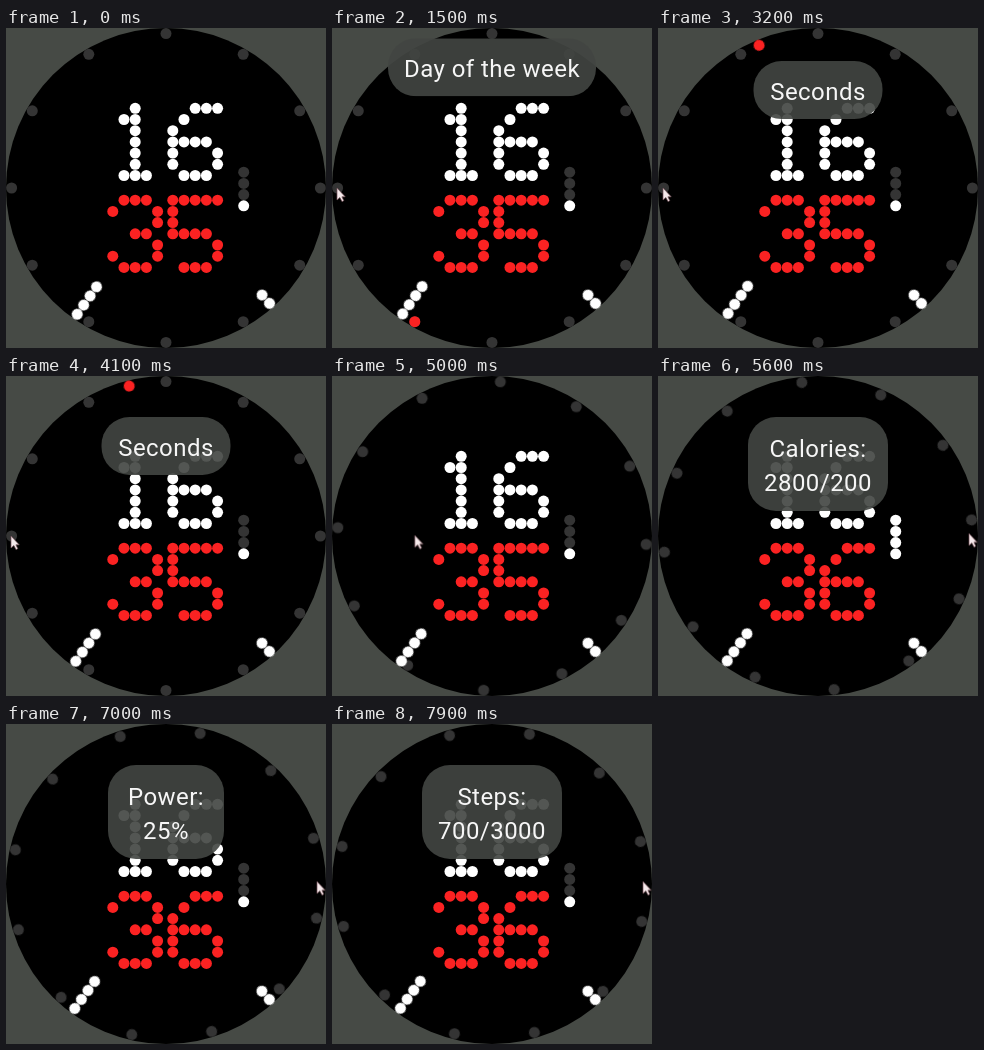
An HTML page for the animation above (8000 ms loop, 320 by 320 pixels).

```html
<!DOCTYPE html>
<html lang="en">
<head>
<meta charset="utf-8">
<title>Dot watch face</title>
<style>
  html, body { margin: 0; width: 100%; height: 100%; overflow: hidden; background: #464a45; }
  svg { display: block; width: 100vw; height: 100vh; }
  svg * { animation-duration: 8s; animation-iteration-count: infinite; animation-timing-function: linear; }

  .white { fill: #fff; }
  .red { fill: #fb2222; }
  .grey { fill: #343434; }

  .spin { transform-origin: 160px 160px; }
  #ring { animation-name: ring; }
  #minute { animation-name: minute; }
  #hour { animation-name: hour; }
  #second { animation-name: second; }

  .show { opacity: 0; animation-timing-function: step-end; }
  #five { animation-name: five; }
  #six { animation-name: six; }
  #full { animation-name: full; }
  #dayMark { animation-name: dayMark; }
  #monthMark { animation-name: monthMark; }
  #secondMark { animation-name: secondMark; }

  #toasts { animation-name: drop; animation-timing-function: ease-in-out; }
  #toasts rect { fill: #424643; fill-opacity: .91; }
  #toasts text {
    fill: #f6f6f6; text-anchor: middle;
    font: 24px Roboto, sans-serif; letter-spacing: .45px;
  }
  #day { animation-name: day; }
  #month { animation-name: month; }
  #seconds { animation-name: seconds; animation-timing-function: linear; }
  #calories { animation-name: calories; }
  #power { animation-name: power; }
  #steps { animation-name: steps; }

  #cursor { animation-name: move; animation-timing-function: ease-in-out; }
  #arrow { animation-name: arrow; }

  @keyframes minute { from { transform: rotate(215.11deg); } to { transform: rotate(216.39deg); } }
  @keyframes hour { from { transform: rotate(138.1deg); } to { transform: rotate(138.21deg); } }
  @keyframes second { from { transform: rotate(306.84deg); } to { transform: rotate(383.64deg); } }
  @keyframes ring {
    0%, 61.4% { transform: rotate(0deg); }
    91.25%, 94.99% { transform: rotate(83.2deg); }
    95% { transform: rotate(93.6deg); }
    100% { transform: rotate(107.5deg); }
  }

  @keyframes five { 0% { opacity: 1; } 69.2%, 100% { opacity: 0; } }
  @keyframes six { 0% { opacity: 0; } 69.2%, 100% { opacity: 1; } }
  @keyframes full { 0% { opacity: 0; } 64% { opacity: 1; } 78.7%, 100% { opacity: 0; } }
  @keyframes dayMark { 0% { opacity: 0; } 17% { opacity: 1; } 26.25%, 100% { opacity: 0; } }
  @keyframes monthMark { 0% { opacity: 0; } 26.25% { opacity: 1; } 36.25%, 100% { opacity: 0; } }
  @keyframes secondMark { 0% { opacity: 0; } 36.25% { opacity: 1; } 61.4%, 100% { opacity: 0; } }

  /* every message slides down from the same height */
  @keyframes drop {
    0%, 17.87%, 27.5%, 36.88%, 57.5%, 64.75%, 79%, 93.88% { transform: translateY(-33px); }
    22.62%, 27.49%, 32.25%, 36.87%, 41.63%, 54.37%, 69.5%, 78.99%, 83.75%, 93.87%, 98.63%, 100% { transform: translateY(0); }
  }
  @keyframes day { 0% { opacity: 0; } 17.87% { opacity: 1; } 27.5%, 100% { opacity: 0; } }
  @keyframes month { 0% { opacity: 0; } 27.5% { opacity: 1; } 36.88%, 100% { opacity: 0; } }
  @keyframes seconds { 0%, 36.87% { opacity: 0; } 36.88%, 54.37% { opacity: 1; } 57.5%, 100% { opacity: 0; } }
  @keyframes calories { 0% { opacity: 0; } 64.75% { opacity: 1; } 79%, 100% { opacity: 0; } }
  @keyframes power { 0% { opacity: 0; } 79% { opacity: 1; } 93.88%, 100% { opacity: 0; } }
  @keyframes steps { 0% { opacity: 0; } 93.88%, 100% { opacity: 1; } }

  @keyframes arrow { 0% { opacity: 0; } .7%, 100% { opacity: 1; } }
  @keyframes move {
    0% { transform: translate(301px, 106px); }
    16.25%, 61.5% { transform: translate(5px, 160px); }
    64.4%, 100% { transform: translate(311px, 157.5px); }
  }
</style>
</head>
<body>
<svg viewBox="0 0 320 320">
  <circle cx="160" cy="160" r="160"/>
  <g id="ring" class="spin grey"></g>
  <g id="dayMark" class="show red"></g>
  <g id="monthMark" class="show red"></g>
  <g id="secondMark" class="show red"><g id="second" class="spin"></g></g>
  <g id="minute" class="spin white"></g>
  <g id="hour" class="spin white"></g>
  <g id="hours" class="white"></g>
  <g id="tens" class="red"></g>
  <g id="five" class="show red"></g>
  <g id="six" class="show red"></g>
  <g id="meter" class="grey"></g>
  <g id="base" class="white"></g>
  <g id="full" class="show white"></g>
  <g id="toasts"></g>
  <g id="cursor"><path id="arrow" class="show" d="M0 0V12L2.9 9.5L5 13.6L6.8 12.7L4.9 8.8H8.2Z" fill="#f5e9eb" stroke="#76525a" stroke-width=".7"/></g>
</svg>
<script>
  const $ = id => document.getElementById(id);
  const NS = "http://www.w3.org/2000/svg";
  const PITCH = 11.2, RIM = 154.4;

  function add(parent, tag, attrs, text) {
    const el = document.createElementNS(NS, tag);
    for (const key in attrs) el.setAttribute(key, attrs[key]);
    if (text) el.textContent = text;
    return parent.appendChild(el);
  }

  const dot = (id, x, y) => add($(id), "circle", { cx: x, cy: y, r: 5.5 });

  function polar(id, deg, radius = RIM) {
    const a = deg * Math.PI / 180;
    dot(id, 160 + radius * Math.sin(a), 160 - radius * Math.cos(a));
  }

  const glyphs = {
    1: "..#.. .##.. ..#.. ..#.. ..#.. ..#.. .###.",
    3: ".###. #...# ....# ..##. ....# #...# .###.",
    5: "##### #.... #.... ####. ....# ....# .###.",
    6: "..### .#... #.... ####. #...# #...# .###."
  };

  function digit(id, n, x, y) {
    glyphs[n].split(" ").forEach((row, j) =>
      [...row].forEach((c, i) => c === "#" && dot(id, x + i * PITCH, y + j * PITCH)));
  }

  digit("hours", 1, 106.8, 80.3);
  digit("hours", 6, 166.8, 80.3);
  digit("tens", 3, 106.8, 172.2);
  digit("five", 5, 166.8, 172.2);
  digit("six", 6, 166.8, 172.2);

  for (let i = 0; i < 12; i++) polar("ring", i * 30);
  for (let i = 0; i < 4; i++) polar("minute", 0, RIM - i * PITCH);
  for (let i = 0; i < 2; i++) polar("hour", 0, RIM + .6 - i * PITCH);
  polar("dayMark", 210);
  polar("monthMark", 30);
  polar("second", 0);

  for (let i = 0; i < 3; i++) {
    dot("meter", 237.7, 144.2 + i * PITCH);
    dot("full", 237.7, 144.2 + i * PITCH);
  }
  dot("base", 237.7, 177.8);

  function toast(id, width, ...lines) {
    const g = add($("toasts"), "g", { id, class: "show" });
    const two = lines.length > 1;
    add(g, "rect", { x: 160 - width / 2, y: 41, width, height: two ? 94 : 58, rx: 28 });
    lines.forEach((line, i) => add(g, "text", { x: 160, y: (two ? 80.5 : 79.5) + i * 34.3 }, line));
  }

  toast("day", 208, "Day of the week");
  toast("month", 116, "Month");
  toast("seconds", 129, "Seconds");
  toast("calories", 140, "Calories:", "2800/200");
  toast("power", 116, "Power:", "25%");
  toast("steps", 140, "Steps:", "700/3000");
</script>
</body>
</html>
```
